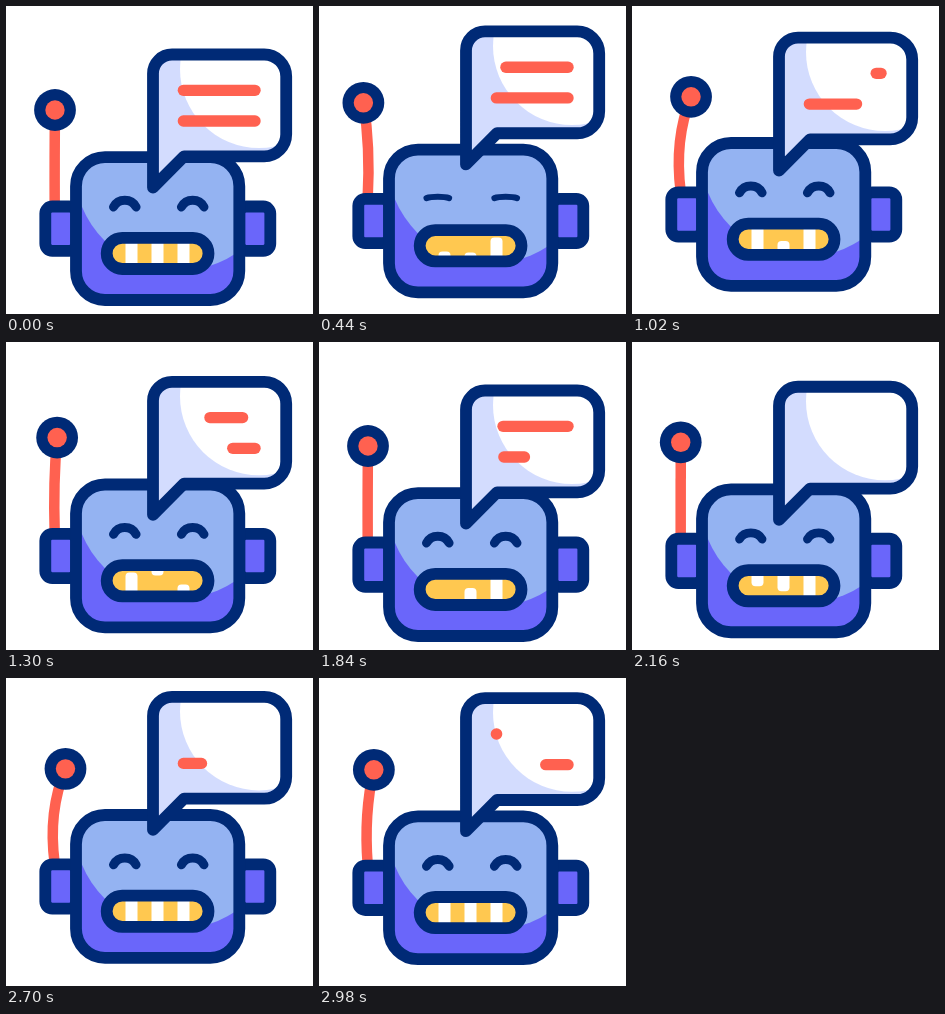
Write an HTML page with a canvas that moves like this. It is 307 px wide and 308 px high and loops after 3000 ms.

```html
<!DOCTYPE html>
<html lang="en">
<head>
<meta charset="utf-8">
<title>Talking robot</title>
<style>
html, body { margin: 0; width: 100%; height: 100%; overflow: hidden; background: #fff; }
canvas { display: block; width: 307px; height: 308px; }
</style>
</head>
<body>
<canvas id="stage"></canvas>
<script>
const W = 307, H = 308, LOOP = 3000, BEAT = 1800, SWEEP = 200;
const NAVY = '#002a76', LIGHT = '#94b3f2', PURPLE = '#6a66fa';
const RED = '#ff6150', YELLOW = '#ffc850', SHADE = '#d3dcfe';

const canvas = document.getElementById('stage');
const ctx = canvas.getContext('2d');
const dpr = window.devicePixelRatio || 1;
canvas.width = Math.round(W * dpr);
canvas.height = Math.round(H * dpr);

// Each strip is drawn in at the first time and wiped out at the second
const textStrips = [
  [[-SWEEP, 418], [638, 860], [1131, 1237], [1500, 1825], [2281, 2435], [2953, LOOP]],
  [[-SWEEP, 592], [880, 1182], [1746, 1823], [2329, 2426], [2630, 2862]]
];
const teeth = [
  [[-SWEEP, 280], [550, 1280], [2050, LOOP]],
  [[-SWEEP, 270], [630, 900], [1250, 1750], [2000, LOOP]],
  [[-SWEEP, 420], [680, 1160], [1600, LOOP]]
];

const ramp = (t, from, to) => Math.min(1, Math.max(0, (t - from) / (to - from)));

function ease(t, from, to) {
  const u = ramp(t, from, to);
  return u * u * (3 - 2 * u);
}

const bump = (t, from, to) => Math.sin(Math.PI * ramp(t, from, to)) ** 2;

const headLift = t => -14.2 * (ease(t, 220, 640) - ease(t, 1080, 1600));

const sway = t => -10.5 * ease(t, 340, 560) + 21 * ease(t, 560, 740) - 10.5 * ease(t, 960, 1440);

const hop = t => 4.5 * bump(t, 430, 650)
  - 15.5 * (ease(t, 120, 420) - ease(t, 860, 1080) + ease(t, 2260, 2720));

const eyeOpen = t => 1 - 0.8 * bump(t, 340, 540);

// Visible part of a strip as [start, end] between 0 and 1
function visible(cycles, t) {
  const [show, hide] = cycles.findLast(c => t >= c[0]);
  return [ramp(t, hide, hide + SWEEP), ramp(t, show, show + SWEEP)];
}

function box(x, y, w, h, r) {
  ctx.beginPath();
  ctx.roundRect(x, y, w, h, r);
}

function outline(width = 11.8, color = NAVY) {
  ctx.lineWidth = width;
  ctx.strokeStyle = color;
  ctx.stroke();
}

function fill(color) {
  ctx.fillStyle = color;
  ctx.fill();
}

function disc(x, y, r, color) {
  ctx.beginPath();
  ctx.arc(x, y, r, 0, Math.PI * 2);
  fill(color);
}

// Filled and outlined shape with details clipped to its inside
function shape(path, color, details) {
  path();
  fill(color);
  ctx.save();
  ctx.clip();
  details();
  ctx.restore();
  path();
  outline();
}

function drawAntenna(dx) {
  const x = 49 + dx, y = 104 + Math.abs(dx) * 0.1;
  ctx.beginPath();
  ctx.moveTo(48.7, 200);
  ctx.quadraticCurveTo(48.5 - dx * 0.65, 148, x, y);
  ctx.lineCap = 'butt';
  outline(10.5, RED);
  disc(x, y, 20.9, NAVY);
  disc(x, y, 9.7, RED);
}

function drawEye(x, open) {
  const y = 199.5 + 1.5 * open, rise = 9 * open;
  ctx.beginPath();
  ctx.moveTo(x - 11.3, y);
  ctx.bezierCurveTo(x - 6.5, y - rise, x + 6.5, y - rise, x + 11.3, y);
  ctx.lineCap = 'round';
  outline(5.3 + 3.7 * open);
}

function drawTooth(cycles, i, t) {
  const [a, b] = visible(cycles, t);
  if (b - a < 0.02) return;
  const top = a > 0 ? 237 + a * 20 : 230;
  const end = b < 1 ? 237 + b * 20 : 264;
  box(119.5 + i * 26, top, 12, end - top, 4);
  fill('#fff');
}

function drawHead(t, open) {
  for (const x of [39.3, 233.3]) {
    box(x, 200.5, 31, 44.3, 7);
    fill(PURPLE);
    outline();
  }
  shape(() => box(70, 151.2, 163.3, 142.8, 29), PURPLE, () => disc(172, 161, 104, LIGHT));
  drawEye(118.8, open);
  drawEye(186.7, open);
  shape(() => box(100.7, 231.8, 101.8, 31.2, 15.6), YELLOW,
    () => teeth.forEach((cycles, i) => drawTooth(cycles, i, t)));
}

function bubblePath() {
  ctx.beginPath();
  ctx.moveTo(147, 181.5);
  ctx.lineTo(147, 68);
  ctx.arcTo(147, 48.5, 167, 48.5, 19);
  ctx.arcTo(280.2, 48.5, 280.2, 72, 22);
  ctx.arcTo(280.2, 150.3, 256, 150.3, 22);
  ctx.lineTo(178, 150.3);
  ctx.closePath();
}

function drawTextLine(cycles, i, t) {
  const [a, b] = visible(cycles, t);
  const length = 83 * (b - a), width = Math.min(11.3, length);
  if (width < 1) return;
  const x = 171.7 + 83 * a + width / 2, y = 84.3 + i * 30.7;
  ctx.beginPath();
  ctx.moveTo(x, y);
  ctx.lineTo(x + length - width + 0.01, y);
  ctx.lineCap = 'round';
  outline(width, RED);
}

function drawBubble(t) {
  ctx.lineJoin = 'round';
  shape(bubblePath, SHADE, () => disc(253, 63, 79, '#fff'));
  textStrips.forEach((cycles, i) => drawTextLine(cycles, i, t));
}

function draw(t) {
  const beat = t % BEAT;
  ctx.setTransform(dpr, 0, 0, dpr, 0, 0);
  ctx.fillStyle = '#fff';
  ctx.fillRect(0, 0, W, H);
  ctx.translate(0, headLift(beat));
  drawAntenna(sway(beat));
  drawHead(t, eyeOpen(beat));
  ctx.translate(0, hop(t));
  drawBubble(t);
}

const start = performance.now();
function tick() {
  draw((performance.now() - start) % LOOP);
  requestAnimationFrame(tick);
}
tick();
</script>
</body>
</html>
```
